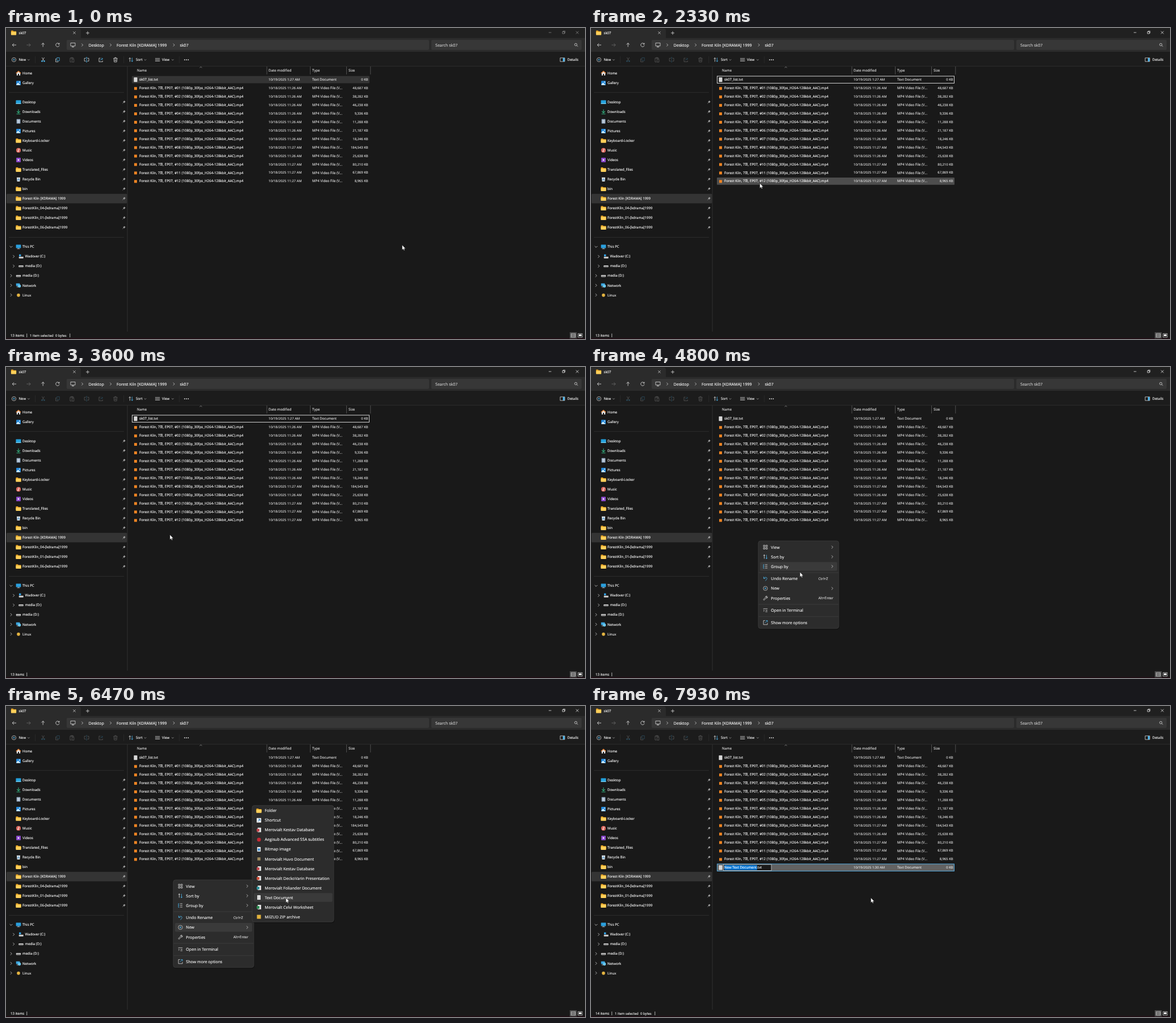
An HTML page that plays this animation: 1021x549 px, repeating every 8 s.

```html
<!DOCTYPE html>
<html lang="en">
<head>
<meta charset="utf-8">
<title>File manager</title>
<style>
html, body { margin: 0; width: 100%; height: 100%; overflow: hidden; background: #191919; }
svg { display: block; width: 1021px; height: 549px; }
text { font-family: "Open Sans", "Noto Sans", "Noto Sans CJK KR", sans-serif; text-rendering: geometricPrecision; stroke-width: .12px; }
</style>
</head>
<body>
<svg id="stage" viewBox="0 0 1021 549" xmlns="http://www.w3.org/2000/svg"></svg>
<script>
const SMALL = 6.1, BIG = 7.1, DATA = 5.92, BLUE = '#4cb4ea', PITCH = 14.92, STEP = 17.03;
const show = 'Forest Kiln', slug = 'ForestKiln';

// Drawing helpers; text is placed by its vertical centre
const box = (x, y, w, h, fill, extra = '') =>
  `<rect x="${x}" y="${y}" width="${w}" height="${h}" fill="${fill}" ${extra}/>`;
const dot = (x, y, r, fill) => `<circle cx="${x}" cy="${y}" r="${r}" fill="${fill}"/>`;
const line = (d, c = '#dcdcdc', w = 0.8) =>
  `<path d="${d}" fill="none" stroke="${c}" stroke-width="${w}" stroke-linejoin="round"/>`;
const solid = (d, c) => `<path d="${d}" fill="${c}"/>`;
const label = (x, y, s, size = SMALL, fill = '#fff', extra = '') =>
  `<text x="${x}" y="${y + size * 0.36}" font-size="${size}" fill="${fill}" stroke="${fill}" ${extra}>${s}</text>`;
const group = (id, body, extra = '') => `<g id="${id}" ${extra}>${body}</g>`;
const at = (x, y, body) => `<g transform="translate(${x} ${y})">${body}</g>`;
const right = (x, y, c = '#d0d0d0') => line(`M${x - 1.2} ${y - 2.4}l2.4 2.4l-2.4 2.4`, c);
const down = (x, y, c = '#b0b0b0') => line(`M${x - 1.8} ${y - 0.9}l1.8 1.8l1.8-1.8`, c, 0.7);
const square = (x, y, c, s = 7) => box(x - s / 2, y - s / 2, s, s, c);

const icons = {
  folder: solid('M-4.6-3.2q0-.7.7-.7h2.7l1.2 1.2h4q.6 0 .6.6V2H-4.6z', '#e5a323') +
    box(-4.6, -1.7, 9.2, 5.6, '#ffd05a', 'rx=".6"'),
  page: box(-3, -4, 6, 8, '#e2e2e2', 'rx=".5"') + line('M-1.8-1.8h3.6M-1.8 0h3.6M-1.8 1.8h3.6', '#b5b5b5', 0.5),
  home: solid('M-3.2-.4L0-3.3L3.2-.4V3.8H1V1H-1V3.8H-3.2z', '#e4e4e4') + line('M-4.2 0L0-3.8L4.2 0', '#ef8a3c', 1.2),
  picture: box(-4, -3.8, 8, 7.6, '#2488d8', 'rx="1"') + solid('M-4 3L-.8-.6L3.8 3.7H-3.4z', '#d9f0ff') + dot(1.9, -1.6, 0.9, '#fff'),
  desktop: box(-4.5, -3.3, 9, 6.6, '#23a0dc', 'rx=".8"') + box(-4.5, 1.9, 9, 1.4, '#7bd4f5'),
  down: line('M0-4V1.7M-2.8-.8L0 2L2.8-.8M-3.5 3.9h7', '#35b583', 1.1),
  doc: box(-3.4, -4, 6.8, 8, '#8fa5bd', 'rx=".8"') + line('M-2-1.7h4M-2 0h4M-2 1.7h4', '#f2f5f8', 0.8),
  music: dot(0, 0, 4.1, '#d9665c') + line('M.1 1.6V-2.4l1.6.9', '#fff', 0.8) + dot(-0.7, 1.6, 1, '#fff'),
  video: box(-4, -3.9, 8, 7.8, '#8848c8', 'rx="1"') + solid('M-1.2-2L2-0L-1.2 2z', '#fff'),
  bin: solid('M-3.1-3.4H3.1L2.4 3.9H-2.4z', '#d5dde2') + line('M-1.5 1.4L0-1.2L1.5 1.4z', '#3b8fd0', 0.8),
  pc: box(-4.4, -3.8, 8.8, 6, '#2a9fdd', 'rx=".6"') + box(-0.8, 2.2, 1.6, 1.2, '#9ab') + box(-2.5, 3.2, 5, 0.8, '#c5ced4'),
  drive: box(-4.2, -1.3, 8.4, 3.4, '#d2d2d2', 'rx=".8"') + box(-3.3, 0.2, 6.6, 1, '#555'),
  system: box(-3.8, 0.6, 8, 2.8, '#cfcfcf', 'rx=".6"') + square(-1.8, -1.9, '#35a4e6', 3.4),
  network: box(-4.2, -3.6, 6.6, 4.8, '#3aa4dd', 'rx=".5"') + dot(1.6, 1.2, 2.7, '#68c6ee') + box(-3.2, 2.3, 3, 0.8, '#ccc'),
  penguin: dot(0, 0.3, 2.8, '#e3b341'),
  media: square(0, 0.6, '#ee8322', 5),
  link: box(-4, -4, 8, 8, '#f0f0f0', 'rx=".6"') + line('M-2 2L1.8-1.8M-1-2H2V1', '#1c78c8', 1),
  bitmap: box(-3.1, -4, 6.2, 8, '#eee', 'rx=".5"') + square(0, 0.5, '#3b8ed0', 4)
};
const icon = (name, x, y) => at(x, y, icons[name]);
const office = (x, y, c) => box(x - 2.2, y - 4, 6, 8, '#e6e6e6', 'rx=".5"') + square(x - 1.6, y + 0.4, c, 4.8);
const pin = y => at(208, y, solid('M.5-2.8L2.8-.5L1.5 .1L.6 1.8L-1.8-.6L-.1-1.5z', '#a4a4a4') + line('M-.7.7L-2.6 2.6', '#a4a4a4', 0.6));

function header() {
  let s = box(0, 0, 1021, 18, '#202020') + box(0, 17.6, 1021, 24.6, '#2b2b2b') +
    '<path d="M0 1H128q4 0 4 4V18H0z" fill="#2b2b2b"/>' + box(0, 42, 1021, 25.5, '#1c1c1c') + box(0, 67.2, 1021, 0.8, '#303030');
  s += icon('folder', 13.5, 8.5) + label(22.5, 9, 'sk07') +
    line('M118.4 6.4l4.2 4.2m0-4.2l-4.2 4.2') + line('M144 5.8v6m-3-3h6');
  s += group('controls', line('M957 8h4.6M981.2 6.6h3.4v3.4h-3.4zM982.4 6.4V5.4h3.4V9h-1M1005 5.6l4.8 4.8m0-4.8l-4.8 4.8', '#fff', 0.7));
  s += line('M18 30h-6.8m2.8-2.8L11.2 30l2.8 2.8', '#e8e8e8') + line('M36.4 30h6.8m-2.8-2.8L43.2 30l-2.8 2.8', '#6c6c6c') +
    line('M65.2 33.4v-6.8m-2.8 2.8l2.8-2.8l2.8 2.8', '#e8e8e8') + line('M93.8 28.4a3.2 3.2 0 1 0 .3 2.2M94 26.4v2.2h-2.2', '#e8e8e8');
  s += box(107, 21, 639, 17.8, '#373737', 'rx="2.2"') + box(750, 21, 265, 17.8, '#373737', 'rx="2.2"');
  s += line('M114 26.4h8v5.4h-8zM116 33.6h4M118 32v1.6') + right(134.5, 30) + right(184.5, 30) + right(296, 30);
  s += label(145.5, 30, 'Desktop', BIG) + label(195, 30, `${show} [KDRAMA] 1999`, BIG) + label(306.5, 30, 'sk07', BIG) +
    label(757, 30, 'Search sk07', BIG, '#d0d0d0') + line('M1006.4 30.8l2 2M1006.9 29.3a2.1 2.1 0 1 1-4.2 0a2.1 2.1 0 1 1 4.2 0');
  return s;
}

function toolbar() {
  const ring = (x, y, c = '#dcdcdc') => `<circle cx="${x}" cy="${y}" r="3.7" fill="none" stroke="${c}" stroke-width=".7"/>`;
  let s = ring(14, 56) + line('M14 54v4m-2-2h4', BLUE) + label(22.5, 56.2, 'New') + down(40, 56.2);
  s += group('edit',
    line('M63.4 52l3.4 5.6M67.6 52l-3.4 5.6') + dot(63.6, 58.6, 1.4, BLUE) + dot(67.4, 58.6, 1.4, BLUE) +
    line('M89.8 52.4h4.4v5.4h-4.4z', BLUE) + line('M88.8 54.4h-1.2v5.4h4.4v-1') +
    line('M140.6 53.4h-2.4v5h2.4M143.6 53.4h2.4v5h-2.4') + line('M142.1 52v8M140.9 52h2.4M140.9 60h2.4', BLUE) +
    line('M166.6 53.2h-2.6v6.4h6.4v-2') + line('M166.4 57.4q.2-3 4-3m-1.8-2l2 2l-2 2', BLUE) +
    line('M189.4 53.6h7.2M191.8 53.4v-1.2h2.4v1.2M190.2 53.8l.6 6.2h4.4l.6-6.2M192.2 55.4v3M193.8 55.4v3'));
  s += line('M114.6 53h-1.6v7h2.4M117.6 53h1.6v1.6M114.8 52.2h2.8v1.4h-2.8zM116.4 55.2h3.4v5h-3.4z', '#5c5c5c');
  s += line('M218.4 59.6v-7m-1.9 1.9l1.9-1.9l1.9 1.9') + line('M222.4 52.4v7m-1.9-1.9l1.9 1.9l1.9-1.9', BLUE) +
    label(229, 56.2, 'Sort') + down(245.5, 56.2);
  s += line('M263 53.8h8.4M263 56.1h8.4M263 58.4h8.4') + label(275, 56.2, 'View') + down(294, 56.2);
  s += [315, 318.2, 321.4].map(x => dot(x, 56.2, 0.9, '#eee')).join('');
  s += [51.5, 207.5, 305.5].map(x => box(x, 50, 0.6, 12, '#333')).join('');
  s += line('M977.2 52.8h8v6.4h-8z') + box(982, 53, 3, 6, BLUE) + label(990, 56.2, 'Details');
  return s;
}

function sidebar() {
  let s = box(213.6, 68, 0.9, 468, '#333') + box(5, 113.5, 203, 0.7, '#363636') + box(5, 369.4, 203, 0.7, '#363636') +
    box(1, 292.8, 212.4, 16.8, '#343434', 'rx="1.5"');
  s += icon('home', 22, 80) + label(29, 80, 'Home') + icon('picture', 22, 97) + label(29, 97, 'Gallery');
  [['desktop', 'Desktop'], ['down', 'Downloads'], ['doc', 'Documents'], ['picture', 'Pictures'], ['folder', 'Keyboard-Locker'],
    ['music', 'Music'], ['video', 'Videos'], ['folder', 'Translated_Files'], ['bin', 'Recycle Bin'], ['folder', 'bin'],
    ['folder', `${show} [KDRAMA] 1999`], ['folder', `${slug}_04-[kdrama]1999`], ['folder', `${slug}_01-[kdrama]1999`],
    ['folder', `${slug}_06-[kdrama]1999`]].forEach(([name, text], i) => {
    const y = 130.8 + i * STEP;
    s += icon(name, 22, y) + label(29, y, text) + pin(y);
  });
  [['pc', 'This PC', 0], ['system', 'Wadover (C:)', 4.5], ['drive', 'media (D:)', 4.5], ['drive', 'media (D:)', 0],
    ['network', 'Network', 0], ['penguin', 'Linux', 0]].forEach(([name, text, dx], i) => {
    const y = 386.2 + i * STEP;
    s += icon(name, 22 + dx, y) + label(29 + dx, y, text) +
      (i ? right(9 + dx, y) : line(`M6.6 ${y - 1.2}l2.4 2.4l2.4-2.4`, '#d0d0d0'));
  });
  return s;
}

const rowY = i => 91.2 + i * PITCH;
function row(i, name, date, type, size) {
  const y = rowY(i);
  return icon(type[0] === 'T' ? 'page' : 'media', 228.5, y) + label(235, y, name) + label(463, y, date, DATA, '#e2e2e2') +
    label(540, y, type, SMALL, '#e2e2e2') + label(638.6, y, size + ' KB', DATA, '#e2e2e2', 'text-anchor="end"');
}

function files() {
  let s = [459.6, 536, 600, 642.4].map(x => box(x, 68, 0.8, 14, '#5c5c5c')).join('') + line('M341.6 70.2l2-1.6l2 1.6', '#bbb', 0.6);
  [[231, 'Name'], [463, 'Date modified'], [540, 'Type'], [604, 'Size']].forEach(([x, t]) => s += label(x, 75, t, SMALL, '#e0e0e0'));
  s += box(222, 84.8, 419, 12.8, '#343434', 'id="picked" rx="1"') + box(222, 0, 419, 12.8, '#4d4d4d', 'id="hover" rx="1"') +
    box(222.5, 85, 418, 12.4, 'none', 'id="focus" stroke="#e6e6e6" stroke-width=".9"');
  s += row(0, 'sk07_list.txt', '10/19/2025 1:27 AM', 'Text Document', '0');
  ['48,687', '38,282', '46,238', '9,336', '11,288', '21,187', '18,246', '184,543', '25,638', '80,210', '67,869', '8,965'].forEach((kb, k) => {
    const n = String(k + 1).padStart(2, '0'), late = k > 6 && k !== 8;
    s += row(k + 1, `${show}, 7회, EP07, #${n} (1080p_30fps_H264-128kbit_AAC).mp4`,
      `10/18/2025 11:2${late ? 7 : 6} AM`, 'MP4 Video File (V...', kb);
  });
  const y = rowY(13), name = 'New Text Document.txt';
  s += group('fresh', box(222.5, y - 6.3, 418, 12.5, '#626262', 'stroke="#55b4ee" stroke-width=".9"') +
    row(13, name, '10/19/2025 1:30 AM', 'Text Document', '0') +
    group('rename', box(233.6, y - 5.3, 84.4, 10.6, '#1a1a1a', 'stroke="#e8e8e8" stroke-width=".7"') +
      box(235, y - 4.3, 57.8, 8.6, '#0a78d6') + label(235, y, name)));
  return s;
}

function footer() {
  const a = text => label(8, 543, text);
  let s = box(0, 547.4, 1021, 1.6, '#220d15');
  s += group('n13', a('13 items')) + group('n14', a('14 items')) + box(36.4, 539.4, 0.8, 6.6, '#ddd');
  s += group('chosen', label(42, 543, '1 item selected', DATA) + label(87, 543, '0 bytes', DATA) + box(112.4, 539.4, 0.8, 6.6, '#ddd'));
  s += box(994, 537, 12.4, 11, '#484848') + line('M996.6 539.4h7.4v6.6h-7.4zM996.6 541.6h7.4M996.6 543.8h7.4', '#ddd', 0.7) +
    line('M1008.8 539.4h7.4v6.6h-7.4z', '#ddd', 0.7) + box(1010.2, 540.8, 4.6, 3.2, '#fff');
  return s;
}

const menuY = [318, 335, 352, 373.7, 390.8, 408, 429.6, 451.2];
const panel = (x, y, w, h) => box(x + 1, y + 2, w, h, '#000', 'rx="4" opacity=".25"') +
  box(x, y, w, h, '#2c2c2c', 'rx="4" stroke="#414141" stroke-width=".7"');

function menu() {
  let s = panel(295, 307, 142, 154.6) + box(298, 0, 136, 15.6, '#3a3a3a', 'id="menuHot" rx="2"');
  s += [362.6, 418.6, 440.4].map(y => box(295.4, y, 141, 0.7, '#424242')).join('');
  const art = [
    line('M-3.4-3.4h2.6v2.6h-2.6zM.9-3.4h2.6v2.6H.9zM-3.4.9h2.6v2.6h-2.6zM.9.9h2.6v2.6H.9z'),
    line('M-2 3.4v-7m-1.7 1.8l1.7-1.8l1.7 1.8') + line('M2-3.4v7M.3 1.8L2 3.6l1.7-1.8', BLUE),
    line('M-.6-3h4.2M-.6 0h4.2M-.6 3h4.2') + line('M-3.4-3.4v7M-3.4-3h1.4M-3.4 0h1.4M-3.4 3.4h1.4', BLUE),
    line('M-3-3.6v3.2H.2M-2.8-.6Q-.4-3.6 2-2.2Q4-.6 1.8 1.8L0 3.8', BLUE),
    '<circle r="3.7" fill="none" stroke="#dcdcdc" stroke-width=".7"/>' + line('M0-1.9v3.8M-1.9 0h3.8', BLUE),
    line('M-3.6 2.4L.2-1.2Q-.2-3.8 2.6-3.6L1.4-2L2.4-1L3.8-2.2Q4 .6 1 .2L-2.4 3.8z'),
    line('M-3.8-2.8h7.6M-3.4-.8l1.6 1.4l-1.6 1.4M0 2.4h3.6M.4 0h3.2'),
    line('M-.6-3.6h-2.8v7.2h7V.8') + line('M-.8.8L3.6-3.6M.6-3.6h3v3', BLUE)];
  ['View', 'Sort by', 'Group by', 'Undo Rename', 'New', 'Properties', 'Open in Terminal', 'Show more options'].forEach((t, i) => {
    const y = menuY[i];
    s += at(307.5, y, art[i]) + label(317.3, y, t, BIG);
    if (i < 3 || i === 4) s += right(425.4, y);
  });
  return s + label(401, 374, 'Ctrl+Z', SMALL, '#ddd') + label(401, 408.3, 'Alt+Enter', SMALL, '#ddd');
}

function submenu() {
  const maker = 'Merovialt';
  const mark = {
    red: y => office(446, y, '#c0434a'),
    orange: y => office(446, y, '#cf4b36'),
    teal: y => office(446, y, '#2a8f98'),
    green: y => office(446, y, '#2a8a50'),
    tan: y => square(446, y, '#a08c5c', 5.4),
    yellow: y => square(446, y, '#e2b23c'),
    round: y => dot(446, y, 3.4, '#c22a35')
  };
  let s = panel(434, 175.6, 144, 205.6) + box(437, 0, 138.6, 15.6, '#3a3a3a', 'id="subHot" rx="2"');
  [['folder', 'Folder'], ['link', 'Shortcut'], ['red', maker + ' Kestav Database'], ['round', 'Aegisub Advanced SSA subtitles'],
    ['bitmap', 'Bitmap image'], ['tan', maker + ' Huvo Document'], ['red', maker + ' Kestav Database'],
    ['orange', maker + ' DeckoVarin Presentation'], ['teal', maker + ' Foliander Document'], ['page', 'Text Document'],
    ['green', maker + ' Celvi Worksheet'], ['yellow', 'MilZUD ZIP archive']].forEach(([name, text], i) => {
    const y = 184.8 + i * STEP;
    s += (mark[name] ? mark[name](y) : icon(name, 446, y)) + label(456.3, y, text, BIG);
  });
  return s;
}

const stage = document.getElementById('stage');
stage.innerHTML = '<defs><clipPath id="cutMenu"><rect id="menuClip" x="280" y="300" width="170" height="0"/></clipPath>' +
  '<clipPath id="cutSub"><rect id="subClip" x="425" y="170" width="165" height="0"/></clipPath></defs>' +
  box(0, 0, 1021, 549, '#191919') + header() + toolbar() + sidebar() + files() + footer() +
  group('menu', menu(), 'clip-path="url(#cutMenu)"') + group('sub', submenu(), 'clip-path="url(#cutSub)"') +
  group('cursor', '<path d="M0 0V8.7L2 6.9L3.3 9.8L4.7 9.2L3.5 6.4H6.1Z" fill="#fff" stroke="#111" stroke-width=".5"/>');

const $ = id => document.getElementById(id);
const seen = (id, on) => $(id).setAttribute('visibility', on ? 'inherit' : 'hidden');
const set = (id, key, value) => $(id).setAttribute(key, value);
const clamp = v => Math.max(0, Math.min(1, v));
const easeOut = v => 1 - (1 - clamp(v)) ** 3;

// Pointer path: tick (1/15 s), x, y
const path = [
  [0, 698.5, 383], [1, 706, 376], [4, 795, 275], [7, 871, 182], [10, 838, 123], [13, 772, 143], [14, 771.5, 142.5], [15, 771.5, 142.5],
  [17, 750, 138], [19, 620, 185], [21, 440, 290], [23, 328, 345], [24, 317, 342], [33, 317, 342],
  [36, 288, 240], [39, 245, 105], [40, 243, 93], [43, 243, 93], [47, 256, 165], [50, 276, 288], [52, 288, 338], [54, 289, 296],
  [56, 294, 308], [57, 294, 308], [58, 294.5, 307], [62, 294.5, 307], [66, 306, 330], [68, 306, 330], [72, 368.4, 362],
  [75, 345, 386], [78, 319, 389], [80, 319, 389], [84, 385, 391], [87, 480, 389], [89, 572, 372], [91, 545, 346],
  [93, 497, 335.5], [95, 497, 335.5], [97, 493.5, 338.5], [120, 493.5, 338.5]];

function pointer(k) {
  const i = Math.max(1, path.findIndex(p => p[0] >= k));
  const [a, x, y] = path[i - 1], [b, u, v] = path[i], f = (k - a) / (b - a);
  return [x + (u - x) * f, y + (v - y) * f];
}

function draw(ms) {
  const k = Math.floor((ms % 8000) * 15 / 1000 + 0.06) % 120;
  const [x, y] = pointer(k);
  set('cursor', 'transform', `translate(${x} ${y})`);

  const active = k >= 28;
  set('controls', 'opacity', active ? 1 : 0.5);
  set('edit', 'opacity', k >= 29 ? 0.3 : 1);
  seen('picked', !active);
  seen('focus', active && k < 61);
  seen('chosen', k < 30 || k >= 118);
  seen('n13', k < 118);
  seen('n14', k >= 118);
  seen('fresh', k >= 118);
  seen('rename', k >= 119);

  const over = Math.floor((y - 84) / PITCH);
  seen('hover', k >= 34 && k < 61 && over >= 0 && over < 13);
  set('hover', 'y', rowY(over) - 6.3);

  const open = k >= 61 && k < 117, grow = easeOut((k - 60) / 6);
  seen('menu', open);
  set('menuClip', 'height', 172 * grow);
  set('menu', 'opacity', clamp(0.4 + grow));
  const subOpen = open && k >= 81, unfold = easeOut((k - 80) / 4);
  seen('sub', subOpen);
  set('subClip', 'height', 220 * unfold);
  set('sub', 'opacity', clamp(0.4 + unfold));

  const item = subOpen ? 4 : menuY.filter(c => c - 8.5 <= y).length - 1;
  seen('menuHot', open && item >= 0 && k >= 64);
  set('menuHot', 'y', menuY[Math.max(0, item)] - 7.8);
  const sub = Math.floor((y - 176.3) / STEP);
  seen('subHot', subOpen && x > 437 && sub >= 0 && sub < 12);
  set('subHot', 'y', 184.8 + sub * STEP - 7.8);
}

const start = performance.now();
function tick() {
  draw(performance.now() - start);
  requestAnimationFrame(tick);
}
tick();
</script>
</body>
</html>
```
